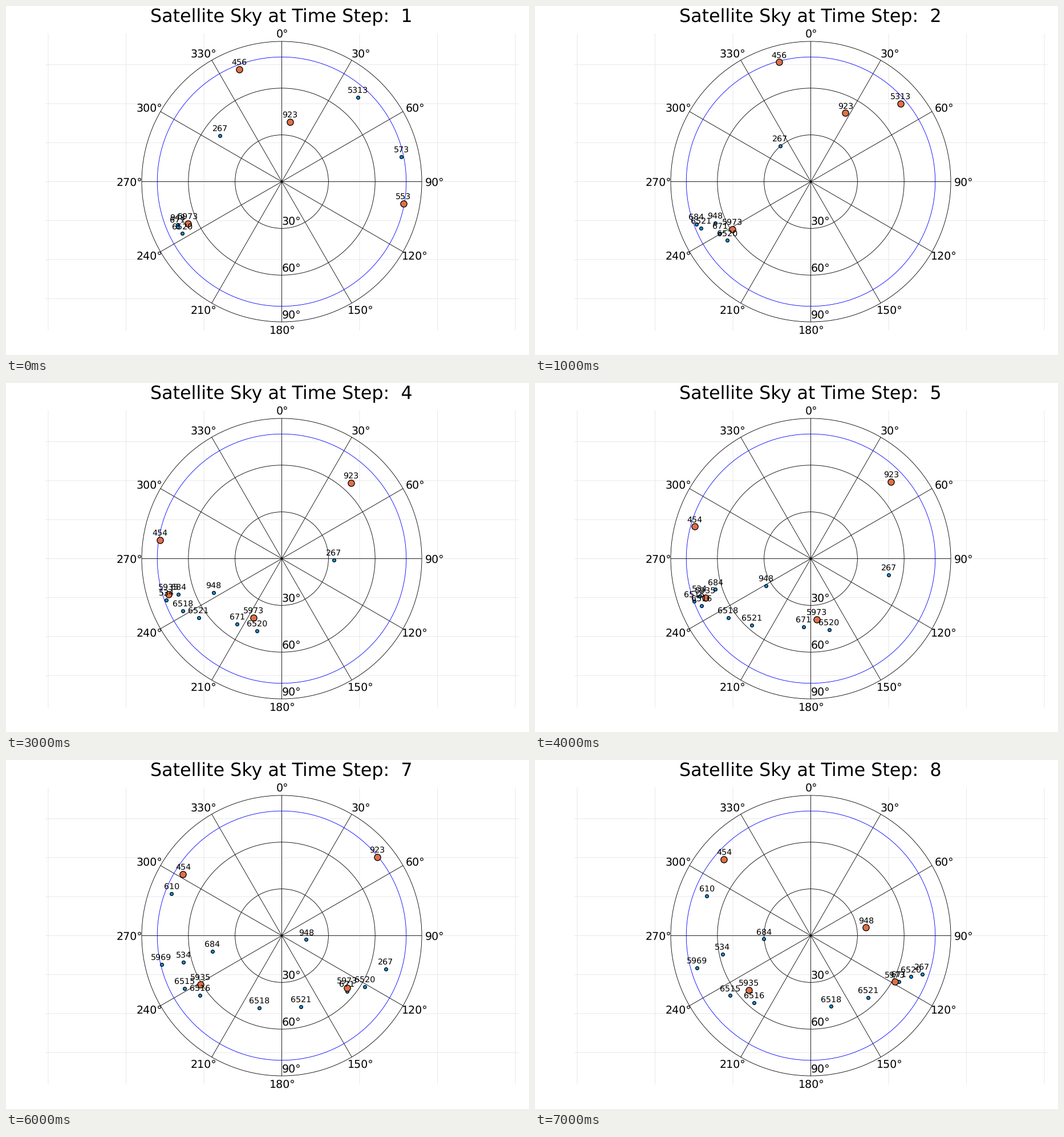
Recreate the animation shown at these times as a matplotlib script. Size 917 px wide and 611 px high, loop 8000 ms.

```python
import math

import matplotlib.pyplot as plt
from matplotlib.animation import FuncAnimation
from matplotlib.patches import Circle

W, H, DPI = 917, 611, 100
PX = 72 / DPI
CX, CY, RIM = 483.5, 307.5, 245.5
CENTRE = complex(CX, CY)
HORIZON = RIM * 80 / 90       # satellites outside this ring are hidden
ORBIT = 1.086                 # orbit radius in Earth radii
BLUE, ORANGE = "#009afa", "#e26f47"

plt.rcParams["font.family"] = "DejaVu Sans"
plt.rcParams["text.hinting"] = "none"
plt.rcParams["path.snap"] = False

# Key points of each pass, {step: x + y * 1j}. Over the ground the motion is
# nearly uniform, so two points usually fix a whole pass.
PASSES = {
    456: {1: 409 + 111j, 2: 427.5 + 98.5j},
    553: {1: 697 + 345.5j, 2: 706 + 347.5j},
    573: {1: 693 + 263.7j, 2: 703 + 266j},
    5313: {1: 617.4 + 159.5j, 3: 659.8 + 181.3j},
    923: {1: 497.6 + 202.6j, 7: 651 + 169.7j},
    267: {1: 375.2 + 226.6j, 3: 505 + 275j, 7: 666 + 366j},
    948: {1: 301 + 383.2j, 8: 580.3 + 293.3j},
    671: {1: 301 + 387j, 5: 470.5 + 427.2j, 8: 638 + 388.2j},
    5973: {1: 319.3 + 380.5j, 8: 630.8 + 388.4j},
    684: {3: 291.5 + 376.7j, 8: 401.2 + 313.4j},
    5935: {3: 273.3 + 364.3j, 8: 375 + 402.7j},
    534: {5: 289 + 373j, 8: 328.5 + 339.8j},
    454: {5: 279.7 + 251.4j, 8: 331.4 + 174.2j},
    610: {6: 281.5 + 230.4j, 8: 301.4 + 238.2j},
    5969: {7: 272.5 + 358j, 8: 283.8 + 364j},
}

# One shared pass, flown by a train of satellites with different lags.
TRAIN = {-1: 277 + 381.3j, 2: 336.9 + 410.4j, 5: 515.5 + 432j, 8: 659.5 + 379.5j}
LAGS = {6520: 0, 6521: 1.98, 6518: 2.95, 6516: 4.9, 6515: 5.85}

# number: step at which it becomes a tracked (large orange) satellite
TRACKED = {456: 1, 553: 1, 923: 1, 5973: 1, 5313: 2, 5935: 3, 454: 4, 948: 8}


def to_ground(point):
    """Chart point to the Earth angle of the satellite, seen from the centre."""
    offset = point - CENTRE
    zenith = abs(offset) / RIM * math.pi / 2
    angle = zenith - math.asin(math.sin(zenith) / ORBIT)
    return angle * offset / abs(offset)


def to_chart(ground):
    """Inverse of to_ground."""
    angle = abs(ground)
    zenith = math.atan2(ORBIT * math.sin(angle), ORBIT * math.cos(angle) - 1)
    return CENTRE + zenith / (math.pi / 2) * RIM * ground / max(angle, 1e-9)


def locate(keys, t):
    """Polynomial motion over the ground through the key points."""
    total = 0
    for a, point in keys.items():
        weight = math.prod((t - b) / (a - b) for b in keys if b != a)
        total += weight * to_ground(point)
    return to_chart(total)


def visible(step):
    """Chart points of all satellites above the horizon, by number."""
    points = {n: locate(keys, step) for n, keys in PASSES.items()}
    points.update((n, locate(TRAIN, step - lag)) for n, lag in LAGS.items())
    return {n: p for n, p in points.items() if abs(p - CENTRE) <= HORIZON}


fig = plt.figure(figsize=(W / DPI, H / DPI), dpi=DPI, facecolor="white")
ax = fig.add_axes([0, 0, 1, 1])
ax.set_xlim(0, W)
ax.set_ylim(H, 0)
ax.axis("off")


def line(xs, ys, color, width, z):
    ax.plot(xs, ys, color=color, lw=width * PX, zorder=z, solid_capstyle="butt")


def label(x, y, text, size, z=5):
    """Text with its digits centred on (x, y)."""
    return ax.text(x, y + 0.365 * size, text, size=size * PX, color="black",
                   ha="center", va="baseline", zorder=z)


def ring(radius, color):
    ax.add_patch(Circle((CX, CY), radius, fill=False, ec=color, lw=0.85 * PX, zorder=2))


def dots(color, size, z):
    return ax.plot([], [], "o", ms=size * PX, mfc=color, mec="black",
                   mew=1.3 * PX, zorder=z)[0]


def draw_chart():
    for i in range(-3, 4):
        x, y = CX + 136.5 * i, CY + 68.25 * i
        line((x, x), (48, 568), "#e6e6e6", 0.9, 1)
        line((69, 899), (y, y), "#e6e6e6", 0.9, 1)
    for zenith in (30, 60, 90):
        radius = RIM * zenith / 90
        ring(radius, "black")
        label(CX + 17, CY + radius - 13.2, f"{zenith}°", 19)
    ring(HORIZON, "blue")
    for azimuth in range(0, 360, 30):
        s = math.sin(math.radians(azimuth))
        c = math.cos(math.radians(azimuth))
        line((CX, CX + RIM * s), (CY, CY - RIM * c), "black", 0.85, 2)
        shift = 0 if azimuth % 180 == 0 else math.copysign(8, s)
        label(CX + 0.8 + 259.5 * s + shift, CY - 259.5 * c, f"{azimuth}°", 19)


draw_chart()
title = label(CX - 0.3, 16, "", 31.75)
small = dots(BLUE, 5.7, 3)
large = dots(ORANGE, 11.2, 4)
tags = {n: label(0, 0, str(n), 14.2, 6) for n in (*PASSES, *LAGS)}


def update(frame):
    step = frame + 1
    title.set_text(f"Satellite Sky at Time Step:  {step}")
    points = visible(step)
    tracked = [p for n, p in points.items() if step >= TRACKED.get(n, math.inf)]
    others = [p for p in points.values() if p not in tracked]
    for artist, group in ((large, tracked), (small, others)):
        artist.set_data([p.real for p in group], [p.imag for p in group])
    for n, tag in tags.items():
        tag.set_visible(n in points)
        if n in points:
            tag.set_position((points[n].real, points[n].imag - 8))
    return [title, small, large, *tags.values()]


anim = FuncAnimation(fig, update, frames=8, interval=1000, repeat=True,
                     repeat_delay=0, blit=False)
plt.show()
```
